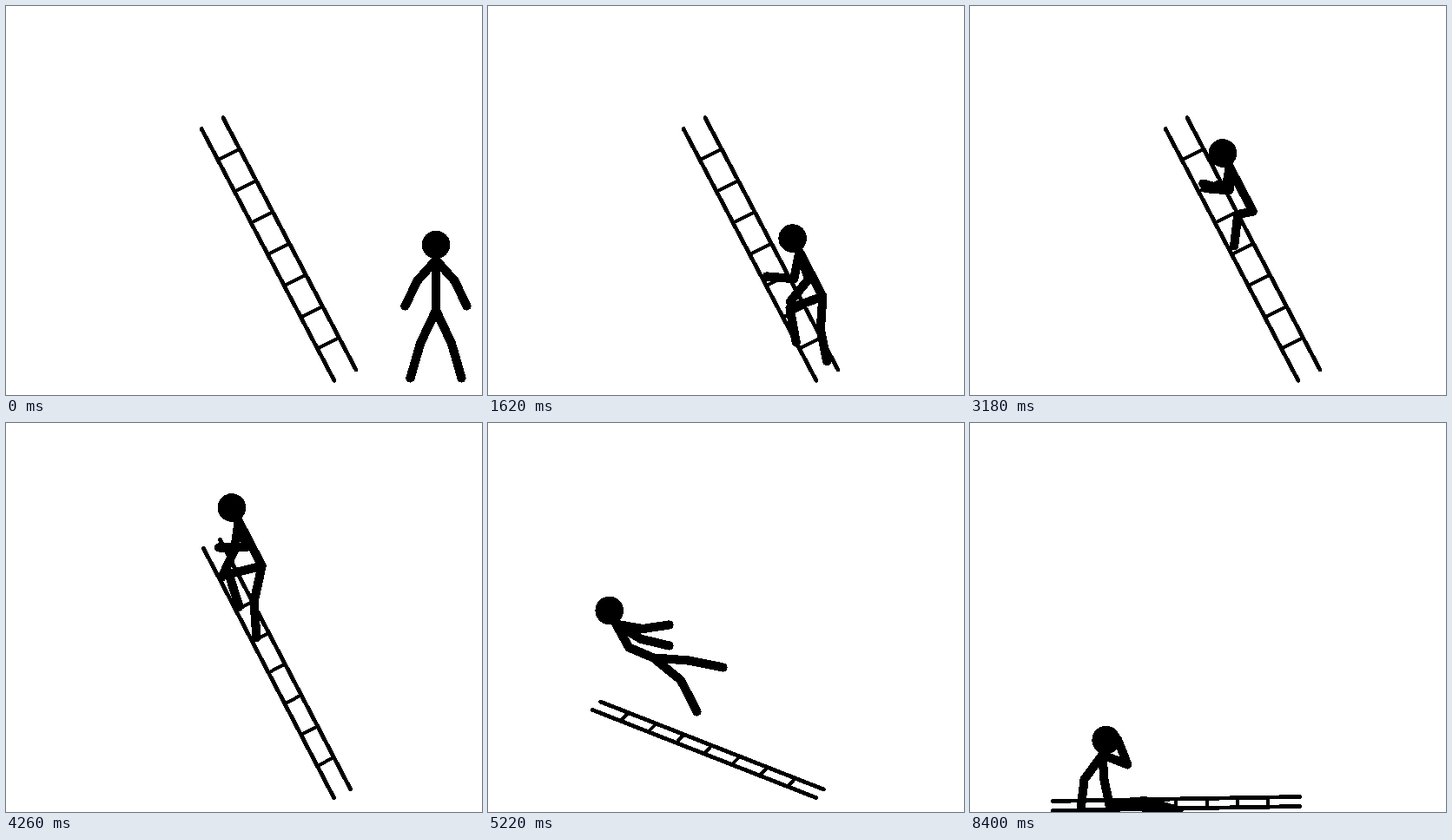
Recreate the animation shown at these times as an HTML page. Size 548 by 448 pixels, loop 9780 ms.

```html
<!DOCTYPE html>
<html lang="en">
<head>
<meta charset="utf-8">
<title>Ladder climb</title>
<style>
  html, body { margin: 0; width: 100%; height: 100%; overflow: hidden; background: #fff; }
  svg { display: block; width: 548px; height: 448px; }
  path { fill: none; stroke: #000; stroke-linecap: round; stroke-linejoin: round; }
</style>
</head>
<body>
<svg viewBox="-0.5 -0.5 548 448" shape-rendering="crispEdges">
  <path id="rails" stroke-width="4.8"/>
  <path id="rungs" stroke-width="4"/>
  <path id="limbs" stroke-width="10.2"/>
  <circle id="head" r="16.3"/>
</svg>
<script>
const LOOP = 9780, STEP = 60, FALL = 3.2;
const SPINE = 58, NECK = 17.5;
const rad = deg => deg * Math.PI / 180;
const el = id => document.getElementById(id);

// A limb is its end point, the sideways bend of its middle joint, and where along it that joint sits.
const limb = (x, y, bend, split = 0.5) => [x, y, bend, split];
// A pose is the hip, spine lean, head tilt, spine curve, then two arms and two legs.
const pose = (x, y, lean, tilt, curve, ...limbs) => [x, y, lean, tilt, curve, ...limbs.flat()];

// lead: 1 when side A is in front, -1 when side B is.
function walk(x, lead, swing) {
  const arm = d => limb(x - 35.5 * d, 345, 4.5 * d);
  const leg = (d, lift) => limb(x - 29.5 * d, 428 - lift, 3.3 * d + lift);
  return pose(x, 350, 0, 0, 0, arm(lead), arm(-lead),
    leg(lead, Math.max(0, -swing) * 9), leg(-lead, Math.max(0, swing) * 9));
}

// Hip and limb ends are given as rung number and distance right of the left rail.
const onLadder = (r, out) => [244.5 + 19.1 * r, 177 + 36.2 * r].map((v, i) => i ? v : v + out);
const hold = (r, out, bend, split) => limb(...onLadder(r, out), bend, split);
const climb = (r, out, ...limbs) => pose(...onLadder(r, out), -27.5, -27, 0, ...limbs);

const mount = climb(4.34, 57.5,
  hold(3.7, 5, -21), hold(4.5, 17, -16), hold(5.8, -1, 26), hold(6.4, 23, 5));
const tuckedLeg = hold(2.73, 7, 13.5, 0.25);
const tucked = climb(1.63, 49.5,
  hold(0.75, 9, -20), hold(0.9, 9, -20), tuckedLeg, tuckedLeg);

// One leg high, one low; flip trades the two sides.
function stride(n, flip) {
  const arms = [hold(n - 0.94, 18, -25), hold(n, 3.5, -5)];
  const legs = [hold(n + 0.94, 5.5, 28.5), hold(n + 1.93, 6.6, 6)];
  if (flip) { arms.reverse(); legs.reverse(); }
  return climb(n - 0.36, 56.5, ...arms, ...legs);
}

const falling = pose(190, 270, -48, -26, -10,
  limb(208, 232, 5), limb(208, 256, 5), limb(270, 281, -2.5), limb(240, 332, -8.4));

const ground = (lean, tilt, armA, armB) =>
  pose(160, 439, lean, tilt, -2, armA, armB, limb(240, 446, -8), limb(238, 447, -1));
const flatArm = limb(150, 444, 3.5);
const lying = ground(-86, -79, flatArm, flatArm);
const rising = ground(-46, -16, limb(141, 442, 18.5, 0.32), limb(147, 443, 16, 0.32));
const sit = armB => ground(-8, 14, limb(127, 445, 9), armB);
const resting = sit(limb(133, 441, 9));

// Each key: time, values, easing power of the move that ends there.
const man = [
  ...[0, 1, 2, 3, 4].map(i => {
    const phase = i * Math.PI / 2;
    return [i * 300, walk(494.5 - 29.2 * i, Math.cos(phase), Math.sin(phase))];
  }),
  [1620, mount],
  [2020, stride(4, true)],
  [2600, stride(3)],
  [3180, tucked],
  [3630, stride(1, true)],
  [4080, stride(0)],
  [4260, stride(0)],
  [5220, falling, FALL],
  [5700, lying],
  [6180, lying],
  [6540, rising],
  [7020, resting],
  [7620, resting],
  [8040, sit(limb(194, 410, 14.6))],
  [8400, sit(limb(169.5, 364, 28.5))]
];

// Foot x, foot y, tilt, length, offset to the second rail.
const upright = [377.5, 431, 62.2, 328, 25, -12.5];
const ladder = [
  [0, upright],
  [4080, upright],
  [4260, [377, 431, 62.4, 324, 19, -10]],
  [5220, [377, 431, 21.45, 276, 9, -9.5], FALL],
  [5460, [379, 441, -1, 284, 0, -11]]
];

function sample(track, t) {
  const i = track.findIndex(key => key[0] > t);
  if (i < 0) return track[track.length - 1][1];
  const [t0, from] = track[i - 1], [t1, to, power = 1] = track[i];
  const u = ((t - t0) / (t1 - t0)) ** power;
  return from.map((v, j) => v + (to[j] - v) * u);
}

const line = (...points) => 'M' + points.map(p => p.map(v => v.toFixed(2)).join(' ')).join('L');
const up = ([x, y], length, deg) => [x + length * Math.sin(rad(deg)), y - length * Math.cos(rad(deg))];

function bent([ax, ay], [bx, by, bend, split = 0.5]) {
  const dx = bx - ax, dy = by - ay, k = bend / Math.hypot(dx, dy);
  return line([ax, ay], [ax + dx * split - dy * k, ay + dy * split + dx * k], [bx, by]);
}

function drawLadder(t) {
  const [x, y, tilt, length, ox, oy] = sample(ladder, t);
  const at = (f, side) => {
    const [px, py] = up([x, y], f * length, tilt - 90);
    return [px + side * ox, py + side * oy];
  };
  let rungs = '';
  for (let i = 0; i < 7; i++) {
    const f = 0.127 + i * 0.1248;
    rungs += line(at(f, 0), at(f, 1));
  }
  el('rails').setAttribute('d', line(at(0, 0), at(1, 0)) + line(at(0, 1), at(1, 1)));
  el('rungs').setAttribute('d', rungs);
}

function drawMan(t) {
  const [x, y, lean, tilt, curve, ...ends] = sample(man, t);
  const hip = [x, y], neck = up(hip, SPINE, lean), head = up(neck, NECK, tilt);
  let d = line(neck, head) + bent(hip, [...neck, curve]);
  for (let i = 0; i < 4; i++) d += bent(i < 2 ? neck : hip, ends.slice(4 * i, 4 * i + 4));
  el('limbs').setAttribute('d', d);
  el('head').setAttribute('cx', head[0]);
  el('head').setAttribute('cy', head[1]);
}

function render(now) {
  const t = Math.floor((now % LOOP) / STEP) * STEP;
  drawLadder(t);
  drawMan(t);
}

const start = performance.now();
function tick() {
  render(performance.now() - start);
  requestAnimationFrame(tick);
}
tick();
</script>
</body>
</html>
```
